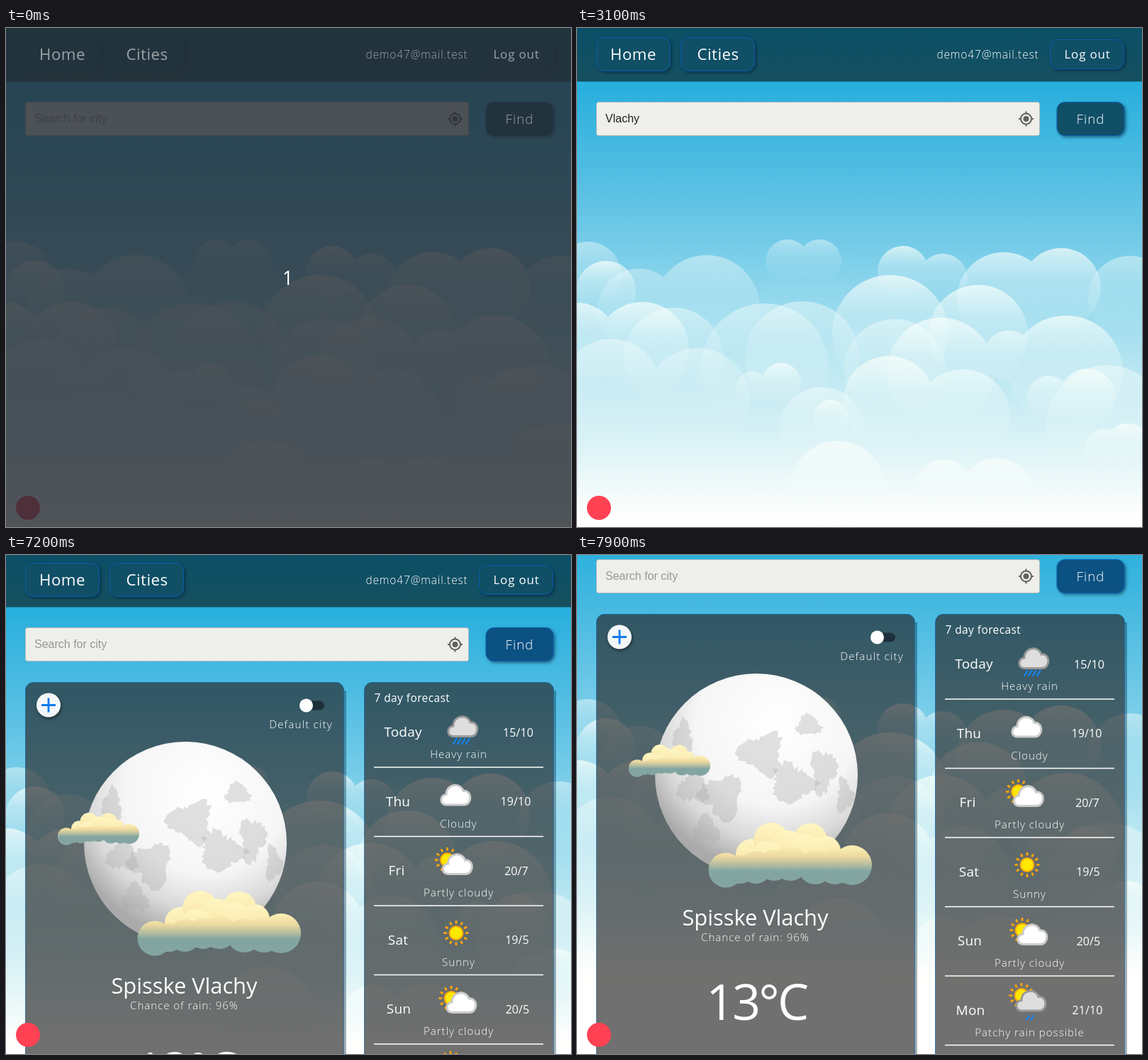
Recreate the animation shown at these times as an HTML page. Size 797x703 px, loop 8 s.

```html
<!DOCTYPE html>
<html lang="en">
<head>
<meta charset="utf-8">
<title>Weather</title>
<style>
  html, body { margin: 0; width: 100%; height: 100%; overflow: hidden; background: #fff; }
  svg { display: block; width: 797px; height: 703px; }
  text { font-family: "Open Sans", "Noto Sans", sans-serif; fill: #fff; white-space: pre; }
  .input { font-family: "Liberation Sans", Arial, sans-serif; }
  .btn { stroke: #0a5cad; filter: drop-shadow(2px 2px 2px rgba(0, 20, 40, .5)); }
</style>
</head>
<body>
<svg id="stage" viewBox="0 0 797 703"></svg>
<script>
const text = (s, x, y, size, weight = 400, gap = 0, anchor = 'middle') =>
  `<text x="${x}" y="${y}" font-size="${size}" font-weight="${weight}" letter-spacing="${gap}" text-anchor="${anchor}">${s}</text>`;
const rect = (x, y, w, h, r, fill, more = '') =>
  `<rect x="${x}" y="${y}" width="${w}" height="${h}" rx="${r}" fill="${fill}" ${more}/>`;
const circle = (x, y, r, fill, more = '') =>
  `<circle cx="${x}" cy="${y}" r="${r}" fill="${fill}" ${more}/>`;
const path = (d, fill, more = '') => `<path d="${d}" fill="${fill}" ${more}/>`;
const group = (id, body, more = '') => `<g id="${id}" ${more}>${body}</g>`;
const at = (x, y, body, scale = 1) => `<g transform="translate(${x} ${y}) scale(${scale})">${body}</g>`;
const range = n => [...Array(n).keys()];
const gradient = (id, stops, more = 'x2="0" y2="1"', kind = 'linear') =>
  `<${kind}Gradient id="${id}" ${more}>` +
  stops.map(([o, c, a = 1]) => `<stop offset="${o}" stop-color="${c}" stop-opacity="${a}"/>`).join('') +
  `</${kind}Gradient>`;
const userY = (a, b) => `gradientUnits="userSpaceOnUse" x1="0" x2="0" y1="${a}" y2="${b}"`;

const defs = '<defs>' +
  gradient('sky', [[.1, '#25aedd'], [.28, '#4fbce2'], [.43, '#74cbe8'], [.57, '#9adbee'],
    [.71, '#bfe8f2'], [.85, '#dff4f7'], [.98, '#fffffd']]) +
  gradient('head', [[0, '#0b4f67'], [1, '#165060']]) +
  gradient('mist', [[0, '#fafffb', 1], [.35, '#f4fdfb', .45], [.95, '#f4fdfb', 0]]) +
  gradient('puff', [[0, '#fff6c2'], [.55, '#faeab0'], [1, '#e8cf95']]) +
  gradient('base', [[0, '#fcefb4'], [.4, '#ecd9a0'], [.75, '#b4bd9f'], [1, '#83a5a2']], userY(34, 68)) +
  gradient('moon', [[0, '#fff'], [.5, '#f6f6f6'], [.72, '#d9d9d9'], [.9, '#aaa']], 'cx=".6" cy=".25" r=".8"', 'radial') +
  '<clipPath id="disc"><circle cx="253" cy="408" r="143"/></clipPath>' +
  '<clipPath id="findClip"><rect x="677" y="104.5" width="95" height="47" rx="9"/></clipPath></defs>';

// Clouds as x, y, radius of their lobes
const faint = [
  [15, 349, 48], [297, 329, 31, 342, 329, 31], [780, 380, 59], [87, 397, 58, 183, 395, 75],
  [265, 478, 90], [318, 466, 81], [136, 464, 70], [448, 482, 72], [48, 508, 70, 170, 525, 74],
  [748, 561, 86], [345, 566, 60]
];
const lobe = (x, y, r) => `M${x - r} ${y}a${r} ${r} 0 1 1 ${2 * r} 0a${r} ${r} 0 1 1 ${-2 * r} 0z`;
const mist = (clouds, alpha) => clouds.map(n =>
  path(range(n.length / 3).map(i => lobe(...n.slice(i * 3, i * 3 + 3))).join(''),
    'url(#mist)', `fill-opacity="${alpha}"`)).join('');
const bright = [
  [460, 343, 36, 516, 353, 35], [602, 382, 66, 683, 366, 56], [41, 370, 42], [442, 430, 82],
  [566, 432, 70], [0, 445, 58, 92, 452, 66], [513, 484, 76, 609, 462, 36, 690, 485, 80],
  [288, 500, 28, 248, 509, 25], [440, 527, 65, 544, 548, 67], [720, 520, 40, 665, 520, 30],
  [358, 549, 25], [777, 590, 33, 743, 592, 27], [368, 650, 68], [517, 648, 40, 592, 658, 52]
];

const button = (x, y, w, h, id = '') => rect(x, y, w, h, 11, '#104f66', `class="btn" id="${id}"`);
const ticks = range(4).map(i => `<path d="M0-10.5v3" transform="rotate(${i * 90})"/>`).join('');
const locate = at(633.5, 128, `<g stroke="#616161" stroke-width="2">${circle(0, 0, 7.5, 'none')}${ticks}</g>` +
  circle(0, 0, 4, '#616161'));

const nav = rect(0, 0, 797, 75.5, 0, 'url(#head)') +
  button(27.5, 13.5, 104, 47) + button(146.5, 13.5, 104, 47) + button(667.5, 16.5, 104, 41) +
  rect(27.5, 104.5, 625, 47, 3, '#eeefea', 'stroke="#b5babb"') + locate +
  '<text id="query" class="input" x="40" y="133" font-size="16"></text>' +
  button(677, 104.5, 95, 47, 'find') +
  '<circle id="ripple" cx="714" cy="128" fill="#fff" clip-path="url(#findClip)"/>';

const labels = text('Home', 79.5, 45, 22.2, 500, .5) + text('Cities', 199, 45, 22.2, 500, .5) +
  text('demo47@mail.test', 579.5, 43, 15.5, 300, .85) + text('Log out', 720, 43, 17, 500, .8) +
  text('Find', 724.5, 135, 18.7, 300, 1);

const drop = path('M399.5 418L369 449A42 42 0 1 0 430 449Z', 'none') +
  group('spin', path('M402 452A25 25 0 0 1 424.5 479M397 502A25 25 0 0 1 374.5 475', 'none'));

// Moon patches with ragged edges
let seed = 7;
const rand = () => (seed = seed * 16807 % 2147483647) / 2147483647;
function patch(x, y, rx, ry) {
  const pts = range(44).map(i => {
    const a = i / 22 * Math.PI, k = .72 + .2 * Math.sin(3 * a + x) + .3 * rand();
    return (x + rx * k * Math.cos(a)).toFixed(1) + ' ' + (y + ry * k * Math.sin(a)).toFixed(1);
  });
  return path('M' + pts.join('L') + 'Z', '#a8a8a8', 'opacity=".34"');
}
const patches = [[327, 338, 19, 16], [262, 378, 34, 32], [303, 420, 34, 30], [348, 402, 20, 32],
  [150, 356, 15, 28], [163, 426, 24, 24], [205, 438, 32, 32], [182, 486, 20, 22], [378, 436, 13, 26]];
const moon = circle(253, 408, 143, 'url(#moon)') +
  `<g clip-path="url(#disc)">${patches.map(p => patch(...p)).join('')}</g>`;

const puffs = [[60, 45, 22], [88, 25, 25], [143, 25, 24], [112, 36, 25], [165, 40, 21], [82, 49, 23], [137, 43, 26]];
const fluffy = puffs.map(p => circle(...p, 'url(#puff)')).join('') +
  [[178, 62, 25], [202, 60, 28], [66, 63, 23], [150, 63, 24], [115, 58, 24], [92, 60, 22], [24, 67, 24.5], [44, 66, 20]]
    .map(b => circle(...b, 'url(#base)')).join('');

const panel = (x, w) =>
  `<path d="M${x + w + 1.5} 193v800" stroke="#023" stroke-opacity=".35" stroke-width="3"/>` +
  rect(x + .5, 181.5, w - 1, 800, 11, '#242424', 'fill-opacity=".65" stroke="#0a5a9c" stroke-opacity=".7"');

const city = panel(27, 450) +
  circle(60, 213.5, 17, '#f3f7f9', 'style="filter:drop-shadow(1px 2px 2px #0008)"') +
  path('M50 213.5h20M60 203.5v20', 'none', 'stroke="#0b7bf0" stroke-width="2.8"') +
  rect(416, 207.5, 33, 13, 6.5, '#1d2f38') + circle(423.5, 214, 9.5, '#fff') +
  text('Default city', 416, 246, 15.3, 300, 1.1) + moon +
  at(73, 365, fluffy, .5) + at(186, 475, fluffy) +
  text('Spisske Vlachy', 251.5, 620, 30.8) +
  text('Chance of rain: 96%', 251.5, 642, 15, 300, 1) +
  text('13°C', 253, 753, 70, 400, -3);

const cloud = (x, y, grey) => at(x, y, path('M9 28.5C-1 28.5 0 14 9 14C9-2 30-3 33 9C46 7 46 28.5 34 28.5Z',
  grey ? '#dedede' : '#fff', `stroke="${grey ? '#999' : '#cbcbcb'}" stroke-width="3"`));
const ray = a => `<path d="M0-13v-4.5" transform="rotate(${a * 30})" stroke="#ffa60a" stroke-width="2.8"/>`;
const sun = (x, y) => at(x, y, circle(0, 0, 9.5, '#ffe800', 'stroke="#ffa60a" stroke-width="2"') +
  range(12).map(ray).join(''));
const rain = (x, y, n, len) => path(range(n).map(i => `M${x + i * 6} ${y}l${-len * .6} ${len}`).join(''),
  'none', 'stroke="#1684e8" stroke-width="2.4"');
const partly = x => sun(x + 8, -14.5) + cloud(x, -23);

// Row: day, its x, temperatures, their x, description, icon
const days = [
  ['Today', 560, '15/10', 722.5, 'Heavy rain', cloud(622, -22, 1) + rain(636, 9, 4, 9)],
  ['Thu', 553, '19/10', 719, 'Cloudy', cloud(612, -23)],
  ['Fri', 551, '20/7', 720, 'Partly cloudy', partly(614.5)],
  ['Sat', 553, '19/5', 721, 'Sunny', sun(635, -9)],
  ['Sun', 554, '20/5', 721.5, 'Partly cloudy', partly(620)],
  ['Mon', 555, '21/10', 720, 'Patchy rain possible', sun(627, -20) + cloud(618, -27, 1) + rain(638, 8, 2, 7)]
];
const row = ([day, dx, temp, tx, note, icon], i) => at(0, 251 + i * 97.5,
  text(day, dx, 7, 19, 500, .2) + icon + text(temp, tx, 6.5, 16, 500, .1) +
  text(note, 638.5, 37, 15.2, 300, .95) +
  '<path d="M519 50h239" stroke="#fff" stroke-width="1.4"/>');
const forecast = panel(505, 268) + text('7 day forecast', 519.5, 209, 15.5, 500, .4, 'start') +
  days.map(row).join('');

const $ = id => document.getElementById(id);
$('stage').innerHTML = defs +
  group('page', rect(0, 0, 797, 703, 0, 'url(#sky)') + mist(faint, .45) + mist(bright, .72) + nav +
    group('loader', drop, 'stroke="#3c5670" stroke-width="6" opacity=".55"') +
    group('result', city + forecast)) +
  circle(31, 676, 17, '#ff4154') +
  group('shade', rect(0, 0, 797, 703, 0, '#272d34', 'fill-opacity=".81"') + text('1', 397.5, 362, 27)) +
  group('labels', labels);

const scrolls = [2, 30, 67, 92, 97, 97, 97, 98];
const clamp = v => Math.max(0, Math.min(1, v));
const show = (id, on) => $(id).setAttribute('display', on ? 'inline' : 'none');
const set = (id, key, value) => $(id).setAttribute(key, value);
const start = performance.now();

function draw() {
  const t = Math.floor((performance.now() - start) % 8000 / 100) * 100;
  const scroll = t < 7200 ? 0 : scrolls[(t - 7200) / 100];
  for (const id of ['page', 'labels']) set(id, 'transform', `translate(0 ${-scroll})`);

  show('shade', t < 100);
  set('labels', 'opacity', t < 100 ? .55 : 1);

  const typed = t >= 2600 && t < 4900 ? 'Vlachy'.slice(0, (t - 2500) / 100) : '';
  $('query').textContent = typed || 'Search for city';
  $('query').style.fill = typed ? '#222' : '#979797';

  const since = t - 4900, hover = clamp(since / 300);
  show('loader', since >= 0 && t < 5400);
  set('spin', 'transform', `rotate(${since * .36} 399.5 477)`);
  show('ripple', since >= 0 && t < 5400);
  set('ripple', 'r', 13 + 55 * hover);
  set('ripple', 'opacity', .2 * clamp((500 - since) / 300));
  set('find', 'fill', `rgb(${16 - 5 * hover},${79 + 2 * hover},${102 + 28 * hover})`);
  show('result', t >= 5400);
  requestAnimationFrame(draw);
}
draw();
</script>
</body>
</html>
```
